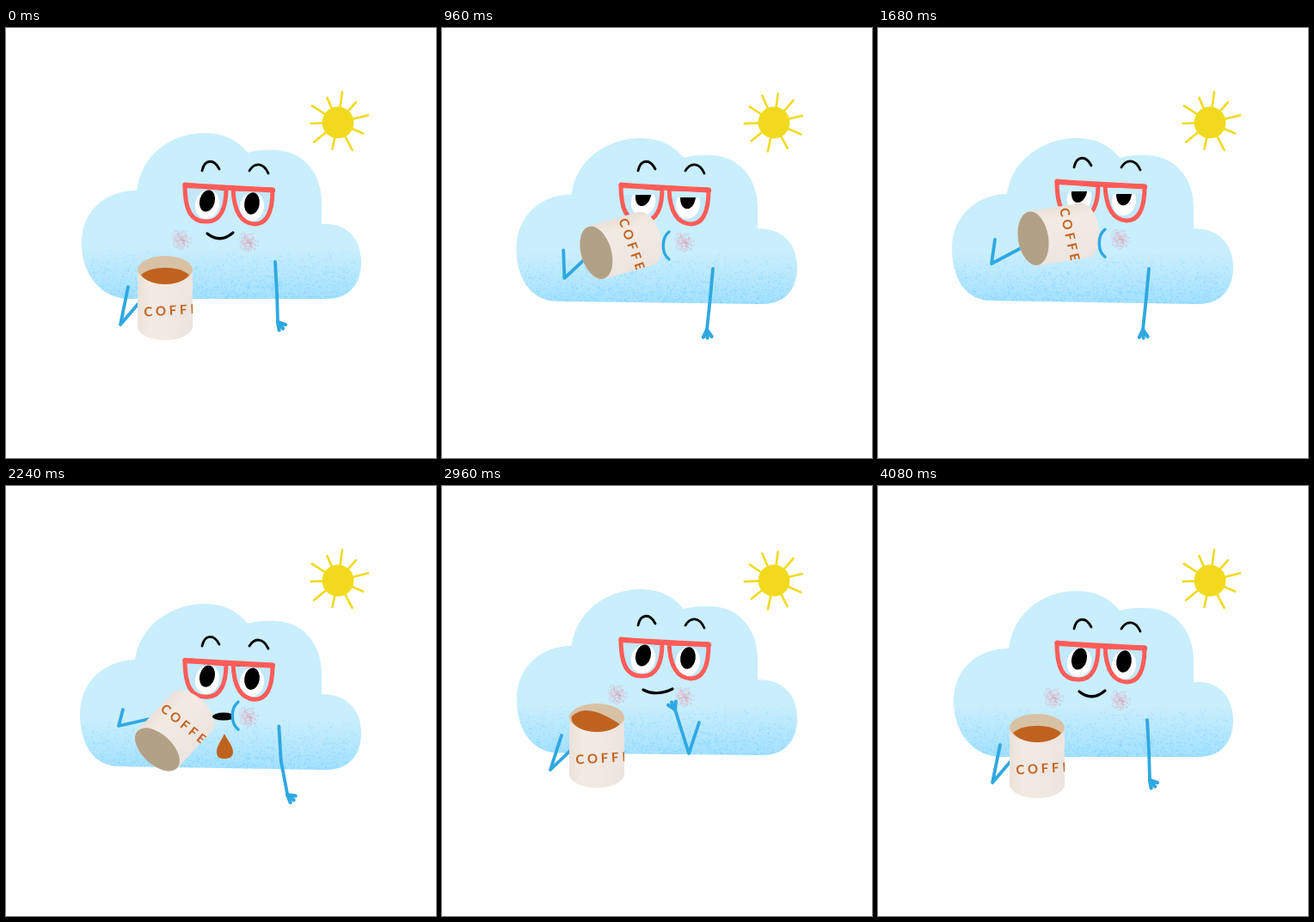
An HTML page with a canvas for the animation above (4.24 s loop, 500 px wide and 500 px high).

```html
<!DOCTYPE html>
<html lang="en">
<head>
<meta charset="utf-8">
<title>Cloud drinking coffee</title>
<style>
html, body { margin: 0; width: 100%; height: 100%; overflow: hidden; background: #fff; }
canvas { display: block; width: 100vw; height: 100vh; }
</style>
</head>
<body>
<canvas id="stage" width="500" height="500"></canvas>
<script>
const c = document.getElementById('stage').getContext('2d');
const LOOP = 4240, STEP = 80, TAU = Math.PI * 2;
const SKY = '#c9eefc', BLUE = '#2fa8e1', RED = '#ff5c58', BROWN = '#c0621f', YELLOW = '#f1da1e';

function ramp(t, from, to) {
  const u = Math.min(1, Math.max(0, (t - from) / (to - from)));
  return u * u * (3 - 2 * u);
}
// Rises from a to b, falls from d to e.
const pulse = (t, a, b, d, e) => ramp(t, a, b) - ramp(t, d, e);
// Adds weighted offsets to a resting pose.
const pose = (rest, ...moves) =>
  rest.map((v, i) => moves.reduce((sum, [weight, offset]) => sum + weight * offset[i], v));

let seed = 7;
const rnd = () => (seed = seed * 16807 % 2147483647) / 2147483647;
const grain = Array.from({ length: 2200 }, () => [85 + rnd() * 330, 317 - 62 * rnd() * rnd()]);
const blush = Array.from({ length: 130 }, () => {
  const a = rnd() * TAU, r = 12 * rnd() ** .8;
  return [Math.cos(a) * r, Math.sin(a) * r];
});

function fill(color, path) { c.fillStyle = color; c.fill(path); }
function stroke(color, width, path) {
  c.strokeStyle = color;
  c.lineWidth = width;
  c.stroke(path);
}
function oval(x, y, rx, ry, turn = 0) {
  const p = new Path2D();
  p.ellipse(x, y, rx, ry, turn, 0, TAU);
  return p;
}
function poly(...n) {
  const p = new Path2D();
  for (let i = 0; i < n.length; i += 2) p.lineTo(n[i], n[i + 1]);
  return p;
}
function group(draw, x = 0, y = 0) {
  c.save();
  c.translate(x, y);
  draw();
  c.restore();
}

function drawSun(w) {
  for (let i = 0; i < 10; i++) {
    const a = .63 * i - 1.4 - .1 * Math.cos(.63 * (i - 2));
    const r = i % 2 ? 31.5 + 2.8 * w : 36 - 2.2 * w;
    stroke(YELLOW, 2.6, poly(386, 110, 386 + r * Math.cos(a), 110 + r * Math.sin(a)));
  }
  fill(YELLOW, oval(386, 110, 18.5, 18.5));
}

function drawCloud(k) {
  const left = 88 - 2 * k, low = 315 - 4 * k, lobe = 189 - 2 * k, neck = 152 - 2 * k;
  const shape = new Path2D(`M${145 - 13 * k} ${low}
    C${109 - 7 * k} ${low} ${left} 285 ${left} 250 C${left} 213 115 ${lobe} ${neck} ${lobe}
    C${neck + 5} 149 190 122 232 122 C253 122 270 131 281 145 C290 142 302 141 315 142
    C348 144 368 172 367 205 L367 ${228 - k}
    C396 ${226 + k} 413 245 413 272 C413 300 397 315 372 315 Z`);
  const g = c.createLinearGradient(0, 256, 0, 316);
  g.addColorStop(0, SKY);
  g.addColorStop(1, '#a4e1ff');
  fill(g, shape);
  c.clip(shape);
  c.fillStyle = 'rgba(120,208,255,.4)';
  for (const [x, y] of grain) c.fillRect(x, y, 1.3, 1.3);
}

function drawEye(lens, x, y, lid, turn) {
  fill('#c2e8fa', lens);
  group(() => {
    c.clip(lens);
    const lidY = y - 27 + 16 * lid;
    if (lid > 0) {
      c.fillStyle = SKY;
      c.fillRect(x - 30, y - 40, 60, lidY - y + 40);
    }
    c.beginPath();
    c.rect(x - 30, lidY, 60, 60);
    c.clip();
    fill('#fff', oval(x, y - 3 * lid, 14, 17, turn));
    fill('#000', oval(x, y - 4 - 6.5 * lid, 8.8, 12.8, turn));
  });
  stroke(RED, 5, lens);
}

function drawFace(lid) {
  stroke('#000', 2.8, new Path2D('M228 166c3 -14 14 -14 20 -2 M283 166c6 -10 16 -10 22 3'));
  const leftLens = new Path2D('M208 182L256 187C256 210 249 225 234 225C215 226 208 212 208 182Z');
  const rightLens = new Path2D('M264 187L310 188C310 213 304 228 289 228C273 227 265 212 264 187Z');
  drawEye(leftLens, 234, 205, lid, .25);
  drawEye(rightLens, 286, 208, lid, .15);
  stroke(RED, 6.2, poly(208.5, 183, 310, 188.5));
}

function drawCheek(x, y) {
  group(() => {
    fill('rgba(240,165,185,.15)', oval(0, 0, 9, 9));
    c.fillStyle = 'rgba(225,140,160,.36)';
    for (const [dx, dy] of blush) c.fillRect(dx, dy, 1.2, 1.2);
  }, x, y);
}

function drawRightArm([sx, sy, ex, ey, wx, wy, angle]) {
  stroke(BLUE, 3.8, poly(sx, sy, ex, ey, wx, wy));
  for (const spread of [-32, 0, 30]) {
    const a = (angle + spread) * Math.PI / 180;
    stroke(BLUE, 4.2, poly(wx, wy, wx + 9.5 * Math.cos(a), wy + 9.5 * Math.sin(a)));
  }
}

function drawCup([x, y, tilt, view], wave) {
  group(() => {
    c.rotate(tilt * Math.PI / 180);
    const h = 31.5 + 1.5 * view, ry = Math.abs(16 * view);
    const side = new Path2D();
    side.ellipse(0, -h, 32, ry, 0, Math.PI, TAU);
    side.ellipse(0, h, 32, ry, 0, 0, Math.PI);
    side.closePath();
    const g = c.createLinearGradient(-32, 0, 32, 0);
    g.addColorStop(0, '#ebe1d9');
    g.addColorStop(.25, '#f3ebe3');
    g.addColorStop(1, '#ece4df');
    fill(g, side);
    group(() => {
      c.clip(side);
      c.rotate(-.06);
      c.font = 'bold 15px Lato, "Open Sans", sans-serif';
      c.letterSpacing = '3.8px';
      c.textBaseline = 'middle';
      c.fillStyle = BROWN;
      c.fillText('COFFE', -27 + 1.5 * view, 2.5 + 13 * view);
    });
    if (view <= 0) return fill('#b1a187', oval(0, h, 31.5, ry));
    fill('#d8c2a6', oval(0, -h, 32, ry));
    c.clip(oval(0, -h + 1, 29.5, ry));
    c.translate(0, -h);
    fill(BROWN, new Path2D(`M-30 ${9 - 9 * wave}
      C${-22 + 8 * wave} ${-6 - 12 * wave} ${22 - 10 * wave} ${-6 + 4 * wave} 30 ${9 + wave}
      L30 30L-30 30Z`));
  }, x, y);
}

function drawLip(x, y, open) {
  if (open) fill('#000', oval(x - 9, y + 1, 13, 4.5));
  const arc = `M${x + 8} ${y - 16}C${x - 1} ${y - 9} ${x - 1} ${y + 9} ${x + 8} ${y + 16}`;
  fill(SKY, new Path2D(`${arc}h6v-32Z`));
  stroke(BLUE, 3.4, new Path2D(arc));
}

function drawDrop(t) {
  const u = (t - 2080) / 160, size = Math.min(1, .4 + .6 * u);
  group(() => {
    c.scale(size, size);
    fill(BROWN, new Path2D('M0 -14C3 -7 10 0 10 7C10 14 5 15 0 15C-5 15 -9 14 -9 7C-9 0 -3 -7 0 -14Z'));
  }, 254, 288 + 14 * u * u);
}

function draw(t) {
  // How strongly each action shapes the pose.
  const dip = pulse(t, 0, 160, 160, 400) + .5 * pulse(t, 3040, 3280, 3280, 3440);
  const drink = pulse(t, 160, 480, 2240, 2560);
  const spill = pulse(t, 1840, 2240, 2240, 2560);
  const wipe = pulse(t, 2560, 2880, 3040, 3360);
  const lift = drink * ramp(t, 480, 1680);
  const gulp = drink * Math.cos(TAU * (t - 960) / 720);
  const sway = drink * Math.cos(TAU * (t - 960) / 1440);
  const glow = pulse(t, 0, 480, 960, 1680) + pulse(t, 2400, 2960, 3040, 4000);
  const lid = pulse(t, 240, 400, 1920, 2080);

  const bodyY = 12 * dip + 6 * gulp + 14 * spill - 2 * wipe;
  const faceY = 14 * dip - 6.7 * drink + 4.7 * gulp + 2 * sway + 24.5 * spill - 4 * wipe;
  const slump = .7 * drink + .3 * lift + .6 * wipe;
  const cup = pose([185, 314, 0, 1], [drink, [24, -67.5, 77.5, -2.1]], [sway, [-1, 6.5, -3.5, 0]],
    [spill, [-12, 33, -32, 0]], [wipe, [-5, -12, 0, 0]], [dip, [-3, 24, -3, -.1]]);
  const leftArm = pose([142, 301, 133, 345], [drink, [2, -36, 15, -45]], [lift, [-8, -19, -16, -26]],
    [spill, [0, 14, -1, 5]], [wipe, [-3, -11, -7, -15]], [dip, [0, 17, 0, 21]]);
  const grip = pose([cup[0] - 29, cup[1] + 4], [drink, [-11, 10]], [spill, [12, -28]]);
  const rightArm = pose([313, 272, 315, 308, 316, 342, 50],
    [drink, [0, 5, -2, 4, -4, 8, 28]], [gulp, [2, 3, -1, 1, -4, 1, 8]],
    [spill, [4, 2, 7, 8, 16, 9, -40]], [wipe, [-14, 3, -28, 3, -45, -82, -165]],
    [dip, [0, 14, 0, 22, -2, 26, 30]]);
  const drinking = t >= 320 && t < 2480;

  c.fillStyle = '#fff';
  c.fillRect(0, 0, 500, 500);
  c.lineCap = c.lineJoin = 'round';
  drawSun(glow);
  group(() => drawCloud(slump), 0, bodyY);
  group(() => drawFace(lid), 0, faceY);
  drawCheek(203, 245 + faceY * .95);
  if (!drinking) {
    stroke('#000', 3.2, new Path2D(
      `M234 ${239 + faceY * .5}q15 ${12 - 4 * wipe} ${30 + 4 * wipe} -1`));
  }
  stroke(BLUE, 3.8, poly(...leftArm, ...grip));
  drawCup(cup, wipe - .5 * dip);
  if (drinking) drawLip(256 + 6 * spill, 253 + .7 * faceY, t >= 2080);
  drawCheek(281, 248 + faceY * .95);
  if (t >= 2080 && t <= 2480) drawDrop(t);
  drawRightArm(rightArm);
}

function tick(now) {
  draw(Math.floor(now % LOOP / STEP) * STEP);
  requestAnimationFrame(tick);
}
draw(0);
requestAnimationFrame(tick);
</script>
</body>
</html>
```
